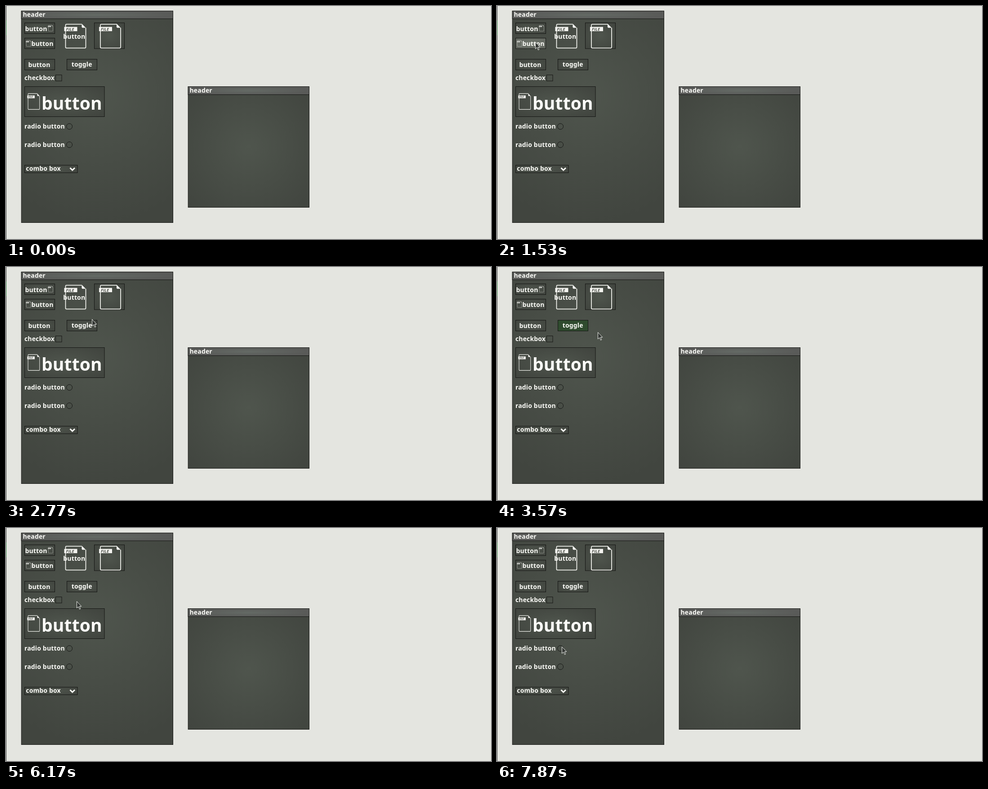
An HTML page that plays this animation: 1079 by 519 pixels, repeating every 8000 ms.

```html
<!DOCTYPE html>
<html lang="en">
<head>
<meta charset="utf-8">
<title>Widget demo</title>
<style>
html, body { margin: 0; width: 100%; height: 100%; overflow: hidden; background: #e4e5e0; }
svg { display: block; width: 1079px; height: 519px; }
text { font: 600 14px "Noto Sans", "Open Sans", sans-serif; letter-spacing: .15px; fill: #fcfcf8; }
text.big { font-size: 39px; }
text.tag { font: italic 700 9px "Open Sans", sans-serif; letter-spacing: .2px; fill: #4a4e47; }
.line { stroke: #141513; fill: none; }
.bar { fill: url(#bar); }
.btn, .face { stroke: #141513; fill: url(#face); }
.btn.hover { fill: url(#glow); }
.btn.on { fill: #2f4b2e; }
</style>
</head>
<body>
<svg viewBox="0 0 1079 519">
  <defs>
    <radialGradient id="tall" gradientUnits="userSpaceOnUse" cx="203" cy="200" r="285">
      <stop offset="0" stop-color="#4f554d"/><stop offset="1" stop-color="#41453f"/>
    </radialGradient>
    <radialGradient id="square" gradientUnits="userSpaceOnUse" cx="540" cy="314" r="185">
      <stop offset="0" stop-color="#4f554d"/><stop offset="1" stop-color="#41453f"/>
    </radialGradient>
    <radialGradient id="bar">
      <stop offset="0" stop-color="#646a65"/><stop offset="1" stop-color="#595a58"/>
    </radialGradient>
    <radialGradient id="face" r=".65">
      <stop offset="0" stop-color="#4f554d"/><stop offset="1" stop-color="#41453f"/>
    </radialGradient>
    <radialGradient id="glow" r=".65">
      <stop offset="0" stop-color="#70766d"/><stop offset="1" stop-color="#62665f"/>
    </radialGradient>
    <g id="file">
      <path d="M37 1H3Q1 1 1 3V52Q1 54 3 54H44Q46 54 46 52V9" fill="none" stroke="#f0f1ec" stroke-width="1.8"/>
      <path d="M37 0L46 9H39Q37 9 37 7Z" fill="#fafaf6"/>
      <path d="M-2 7H27V16.5H-2Z" fill="#f4f4f0"/>
      <text class="tag" x="2" y="15">FILE</text>
    </g>
  </defs>

  <rect width="1" height="519" fill="#4b4d4e"/>
  <rect y="32" width="1" height="33" fill="#3c8a4a"/>

  <rect class="line" x="34.2" y="11.2" width="337.3" height="471.3" style="fill:url(#tall)"/>
  <rect class="line bar" x="34.2" y="11.2" width="337.3" height="17.3"/>
  <rect class="line" x="405.2" y="179.5" width="269.3" height="269" style="fill:url(#square)"/>
  <rect class="line bar" x="405.2" y="179.5" width="269.3" height="18"/>

  <rect class="btn" x="41.5" y="37.5" width="67" height="24"/>
  <rect class="btn" x="41.5" y="71.5" width="67" height="23.5"/>
  <rect class="btn" x="196.5" y="37.5" width="67" height="57.5"/>
  <rect class="btn" x="41.5" y="118.5" width="67" height="24"/>
  <rect class="btn" x="41.5" y="179.5" width="177.5" height="67"/>
  <rect class="btn" id="toggle" x="135.5" y="118.5" width="67" height="24"/>

  <use href="#file" transform="translate(131.5 39.6)"/>
  <use href="#file" transform="translate(209 39.6)"/>
  <use href="#file" transform="translate(48.5 194.5) scale(.57 .665)"/>
  <use href="#file" transform="translate(94 42.5) scale(.22 .25)"/>
  <use href="#file" transform="translate(45 76.5) scale(.22 .25)"/>

  <text x="37.5" y="24">header</text>
  <text x="408.5" y="192.5">header</text>
  <text x="42.5" y="55.5">button</text>
  <text x="56.5" y="89">button</text>
  <text x="127.3" y="72.5">button</text>
  <text x="49.5" y="136">button</text>
  <text x="145.7" y="135">toggle</text>
  <text x="41" y="165">checkbox</text>
  <text class="big" x="79" y="231">button</text>
  <text x="41" y="273">radio button</text>
  <text x="41" y="313.5">radio button</text>

  <rect class="line" x="110.5" y="153.5" width="13.5" height="13.5"/>
  <rect id="mark" x="113" y="156" width="9" height="9" fill="#2f4b2e"/>
  <circle class="line" cx="141" cy="268.3" r="6.5"/>
  <circle class="line" cx="141" cy="309" r="6.5"/>

  <rect class="face" x="41.5" y="354.5" width="117.5" height="17"/>
  <text x="44.3" y="367">combo box</text>
  <path d="M142.5 360.5L147.7 365.7L153 360.5" fill="none" stroke="#fcfcf8" stroke-width="3"/>

  <path id="cursor" d="M.5 .5V15.5L4 12.3L6.6 18L8.8 17L6.3 11.5H10.8Z" fill="#343734" stroke="#eceeea"/>
</svg>
<script>
const LOOP = 8000, STEP = 67, REST = 170;

// Pointer visits: arrival time and place; it rests at each before moving on
const visits = [
  { t: 0, x: 412, y: 102 },
  { t: 930, x: 80, y: 56 },
  { t: 1230, x: 82, y: 80 },
  { t: 2130, x: 229, y: 79 },
  { t: 3030, x: 175, y: 132 },
  { t: 3370, x: 224, y: 145 },
  { t: 3830, x: 182, y: 132 },
  { t: 4130, x: 236, y: 145 },
  { t: 4530, x: 92, y: 174 },
  { t: 5000, x: 116, y: 158 },
  { t: 5400, x: 140, y: 167 },
  { t: 5670, x: 118, y: 162 },
  { t: 6170, x: 157, y: 163 },
  { t: 6600, x: 168, y: 214 },
  { t: 7100, x: 270, y: 240 },
  { t: 7870, x: 144, y: 264 }
];

const cursor = document.getElementById("cursor");
const toggle = document.getElementById("toggle");
const mark = document.getElementById("mark");
const buttons = [...document.querySelectorAll(".btn")].map(el => ({ el, box: el.getBBox() }));

const between = (t, a, b) => t >= a && t < b;
const inside = (b, x, y) => between(x, b.x, b.x + b.width) && between(y, b.y, b.y + b.height);
const ease = k => k * k * (3 - 2 * k);

// The pointer jumps in short steps rather than gliding
function pointerAt(t) {
  const i = visits.findIndex(v => v.t > t);
  if (i < 0) return visits[visits.length - 1];
  const from = visits[i - 1], to = visits[i];
  const span = to.t - from.t - REST;
  const n = Math.ceil(span / STEP);
  const k = ease(Math.floor(n * Math.max(0, t - from.t - REST) / span) / n);
  const mix = axis => Math.round(from[axis] + (to[axis] - from[axis]) * k);
  return { x: mix("x"), y: mix("y") };
}

function draw(t) {
  const { x, y } = pointerAt(t);
  cursor.setAttribute("transform", `translate(${x} ${y})`);
  cursor.style.display = t < 100 ? "none" : "";
  for (const { el, box } of buttons) el.classList.toggle("hover", inside(box, x, y));
  toggle.classList.toggle("on", between(t, 3170, 3900));
  mark.style.display = between(t, 5070, 5830) ? "" : "none";
}

const start = performance.now();
function tick() {
  draw((performance.now() - start) % LOOP);
  requestAnimationFrame(tick);
}
tick();
</script>
</body>
</html>
```
